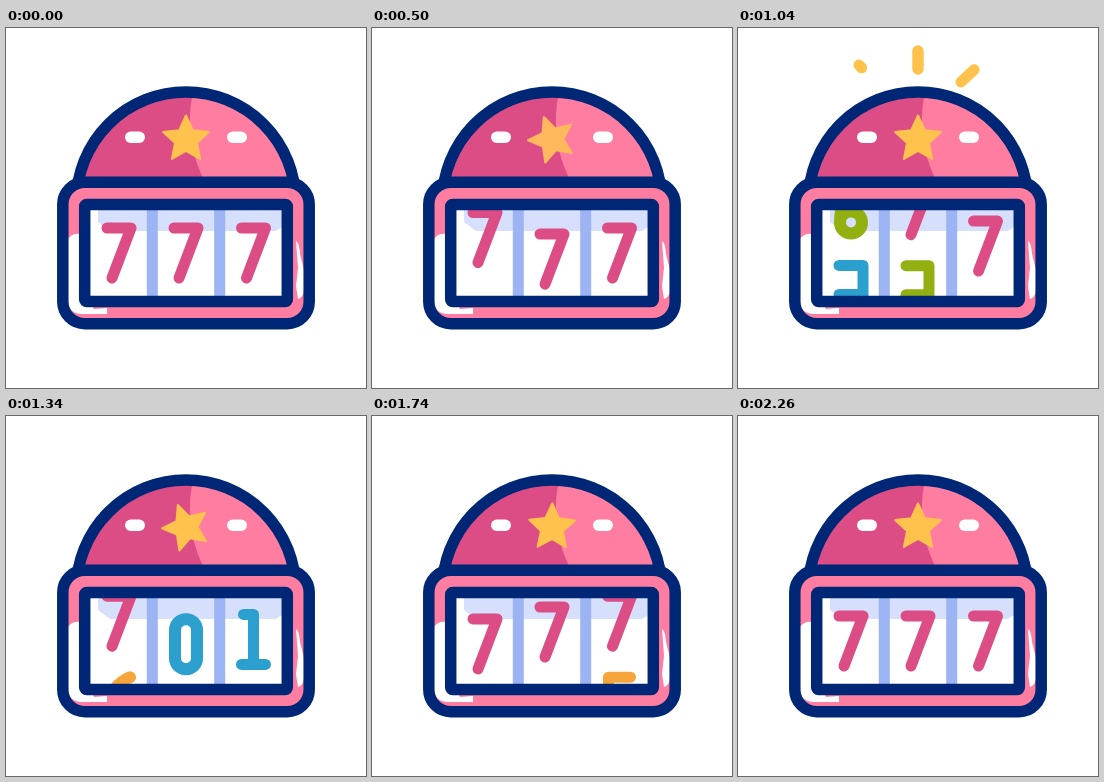
These frames come from a looping animation (360x360 px, 2400 ms). An HTML page:

```html
<!DOCTYPE html>
<html lang="en">
<head>
<meta charset="utf-8">
<title>Slot machine</title>
<style>
  html, body { margin: 0; width: 100%; height: 100%; overflow: hidden; background: #fff; }
  svg { display: block; width: 100vw; height: 100vh; }
  .line { fill: none; stroke-linecap: round; stroke-linejoin: round; }
</style>
</head>
<body>
<svg viewBox="0 0 360 360">
  <defs>
    <clipPath id="dome"><circle cx="180" cy="173.500" r="109"/></clipPath>
    <clipPath id="window"><rect x="83" y="181" width="194" height="88"/></clipPath>
  </defs>

  <g id="rays" class="line"></g>

  <g clip-path="url(#dome)">
    <rect x="60" y="55" width="240" height="105" fill="#ff7da0"/>
    <path d="M60 55H189Q175 108 199 154V160H60Z" fill="#dc4d86"/>
  </g>
  <path d="M70.500 173.500A109.500 109.500 0 0 1 289.500 173.500" fill="none" stroke="#002776" stroke-width="11.500"/>
  <rect x="119" y="103.500" width="20" height="11.500" rx="5.750" fill="#fff"/>
  <rect x="221" y="103.500" width="20" height="11.500" rx="5.750" fill="#fff"/>
  <path id="star" stroke-width="2" stroke-linejoin="round"/>

  <rect x="56.800" y="154.300" width="246.400" height="141.400" rx="22" fill="#ff7da0"/>
  <path d="M62 211Q66 205 75 206V277H86L88 281L101 280V286H75Q62 285 62 272Z" fill="#fff"/>
  <path d="M290 213Q293 214 294 226L298 242V262Q297 270 292 271L290 258L292 240Z" fill="#fff"/>
  <rect x="56.800" y="154.300" width="246.400" height="141.400" rx="22" fill="none" stroke="#002776" stroke-width="11.500"/>

  <rect x="79" y="177" width="202" height="96" fill="#fff"/>
  <path d="M92 182H276V199L270 203H104L92 194Z" fill="#d6e0fc"/>
  <path d="M146.300 182V268M213.700 182V268" stroke="#9cb4f3" stroke-width="11"/>
  <g id="reels" class="line" clip-path="url(#window)"></g>
  <rect x="78.700" y="176.500" width="202.600" height="97" rx="2" fill="none" stroke="#002776" stroke-width="11.500"/>
</svg>
<script>
const LOOP = 2400, PITCH = 82, MID = 225;
const PINK = '#dc4d86', BLUE = '#2ba0cf', GREEN = '#92b010', ORANGE = '#f6a53a';

const GLYPHS = {
  0: 'M-11 -14A11 11 0 0 1 11 -14V14A11 11 0 0 1 -11 14Z',
  1: 'M-10 -25H0V25M-12 25H12',
  2: 'M-12 -26H11V3H-12V26H12',
  3: 'M-12 -26H12V26H-12M-12 3H12',
  5: 'M11 -26H-11V-3H1A14 14 0 0 1 1 25H-11',
  6: 'M11 -26Q-11 -17 -11 13A11 11 0 1 0 11 13A11 11 0 1 0 -11 13',
  7: 'M-12 -25H12L-7 25'
};

// dir: 1 rolls down, -1 rolls up
const REELS = [
  { x: 113, dir: 1, delay: 0, strip: [[7, PINK], [3, BLUE], [6, GREEN], [7, PINK]] },
  { x: 180, dir: -1, delay: 200, strip: [[7, PINK], [2, GREEN], [0, BLUE], [7, PINK]] },
  { x: 247.5, dir: 1, delay: 400, strip: [[7, PINK], [1, BLUE], [5, ORANGE], [7, PINK]] }
];
const ROLL = [[140, 0], [310, -6.5], [510, -15.5], [640, -7], [720, 7], [840, 43], [940, 80],
  [1040, 120], [1140, 160.5], [1340, 226], [1540, 255], [1740, 249], [1860, 246]];
const WOBBLE = [[200, 0], [490, -20], [740, 20], [900, 0]];
const WOBBLE_PERIOD = 860;

const RAYS = [
  { from: [136, 53], to: [121, 37], width: 11, start: 695 },
  { from: [180, 41], to: [180, 23], width: 11.5, start: 840 },
  { from: [223, 54], to: [237, 41], width: 11, start: 880 }
];

const $ = id => document.getElementById(id);
const add = (parent, attrs) => {
  const el = document.createElementNS('http://www.w3.org/2000/svg', 'path');
  for (const k in attrs) el.setAttribute(k, attrs[k]);
  return parent.appendChild(el);
};
const clamp = v => Math.min(1, Math.max(0, v));
const ease = v => { v = clamp(v); return v * v * (3 - 2 * v); };

// Smooth curve through [time, value] keys, flat at both ends and at turning points
function curve(keys, t) {
  const last = keys.length - 1;
  if (t <= keys[0][0]) return keys[0][1];
  if (t >= keys[last][0]) return keys[last][1];
  const i = keys.findIndex(k => k[0] > t) - 1;
  const rate = j => (keys[j + 1][1] - keys[j][1]) / (keys[j + 1][0] - keys[j][0]);
  const slope = j => {
    if (j === 0 || j === last) return 0;
    const a = rate(j - 1), b = rate(j);
    return a * b <= 0 ? 0 : 2 * a * b / (a + b);
  };
  const [t0, v0] = keys[i], [t1, v1] = keys[i + 1];
  const h = t1 - t0, u = (t - t0) / h, u2 = u * u, u3 = u2 * u;
  return v0 * (2 * u3 - 3 * u2 + 1) + v1 * (3 * u2 - 2 * u3)
    + h * (slope(i) * (u3 - 2 * u2 + u) + slope(i + 1) * (u3 - u2));
}

const star = $('star');
star.setAttribute('d', 'M' + Array.from({ length: 10 }, (_, i) => {
  const a = i * Math.PI / 5, r = i % 2 ? 11.5 : 24;
  return (r * Math.sin(a)).toFixed(2) + ' ' + (-r * Math.cos(a)).toFixed(2);
}).join('L') + 'Z');

for (const reel of REELS) {
  reel.els = reel.strip.map(([digit, color]) => add($('reels'), {
    d: GLYPHS[digit], stroke: color, 'stroke-width': digit === 0 || digit === 6 ? 12 : 11
  }));
}
for (const ray of RAYS) ray.el = add($('rays'), { 'stroke-width': ray.width });

function drawReel({ x, dir, delay, els }, t) {
  const pos = curve(ROLL, t - delay);
  els.forEach((el, k) =>
    el.setAttribute('transform', `translate(${x} ${MID + dir * (pos - PITCH * k)})`));
}

function drawRay({ from, to, start, el }, t) {
  const age = t - start;
  const shown = age > 0 && age < 400;
  el.style.display = shown ? '' : 'none';
  if (!shown) return;
  const at = v => from.map((f, i) => f + (to[i] - f) * v).join(' ');
  const tail = ease((age - 200) / 200), head = ease(age / 190);
  el.setAttribute('d', `M${at(tail)}L${at(Math.max(head, tail + 0.001))}`);
}

function draw(t) {
  REELS.forEach(r => drawReel(r, t));
  REELS[0].els[2].setAttribute('stroke', t < 1240 ? GREEN : ORANGE);
  RAYS.forEach(r => drawRay(r, t));
  const turn = curve(WOBBLE, t) + curve(WOBBLE, t - WOBBLE_PERIOD);
  star.setAttribute('transform', `translate(180 111.5) rotate(${turn})`);
  const gold = t > 300 && t < 900 ? '#ffb85c' : '#ffc34d';
  star.setAttribute('fill', gold);
  star.setAttribute('stroke', gold);
  $('rays').setAttribute('stroke', gold);
}

const begin = performance.now();
function tick() {
  draw((performance.now() - begin) % LOOP);
  requestAnimationFrame(tick);
}
draw(0);
requestAnimationFrame(tick);
</script>
</body>
</html>
```
